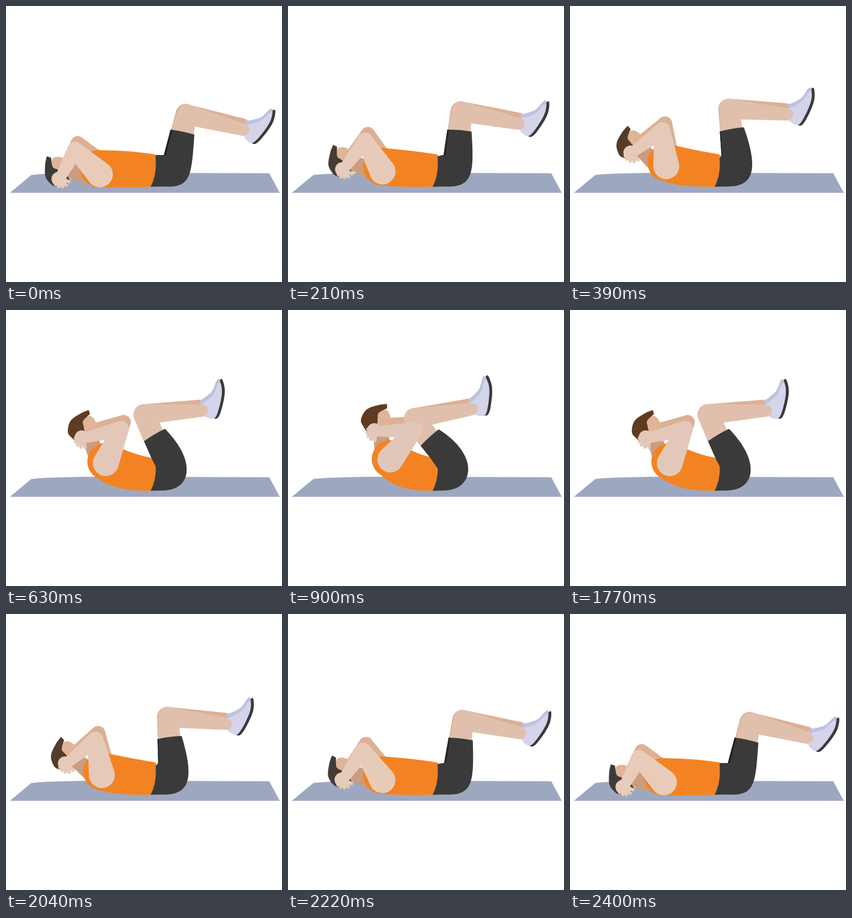
Recreate the animation shown at these times as an HTML page with a canvas. Size 500 by 500 pixels, loop 3000 ms.

```html
<!DOCTYPE html>
<html lang="en">
<head>
<meta charset="utf-8">
<title>Crunch</title>
<style>
html, body { margin: 0; width: 100%; height: 100%; overflow: hidden; background: #fff; }
canvas { display: block; width: 100vw; height: 100vh; }
</style>
</head>
<body>
<canvas id="stage" width="500" height="500"></canvas>
<script>
const ctx = document.getElementById('stage').getContext('2d');
const RAD = Math.PI / 180;
const LOOP = 3000, HALF = 1500, MOVE = 900, STEP = 30;
const HIP = [278, 307], WAIST = [255, 310], SEAT = [262, 327.5];
const FRONT = '#e0c0ad', BACK = '#dcb094', FACE = '#dfb498', NECK = '#cb9c7d';
const ORANGE = '#f38322', DARK = '#3a3a3a';

// Outlines around the tip of the fringe and around the ankle.
const HAIR = [[1, 0], [1, 8], [-14, 16], [-16, 26], [-18, 40], [-30, 54], [-43, 39], [-46, 27], [-36, 10], [-15, 2]];
const HEAD = [[-14, 14], [0, 11], [7, 23], [5, 45], [1, 57], [-20, 60], [-30, 45], [-18, 25]];
const SHOE = [[-2.5, -14.5], [24, -21], [40, -35], [46, -35], [42, -15], [27, 8], [9, 25], [-5, 15]];

const lerp = (a, b, u) => a + (b - a) * u;
const mix = (p, q, u) => p.map((v, i) => lerp(v, q[i], u));
const rgb = (a, b, u) => `rgb(${mix(a, b, u).map(Math.round)})`;

// Point (x, y) of a frame turned by deg around its origin.
function local([ox, oy], deg, x, y) {
  const c = Math.cos(deg * RAD), s = Math.sin(deg * RAD);
  return [ox + x * c - y * s, oy + x * s + y * c];
}
// Degrees run clockwise from straight up.
const polar = (origin, deg, r) => local(origin, deg, 0, -r);

function disc([x, y], r, color) {
  ctx.fillStyle = color;
  ctx.beginPath();
  ctx.arc(x, y, r, 0, 7);
  ctx.fill();
}

function limb(a, ra, b, rb, color) {
  const dx = b[0] - a[0], dy = b[1] - a[1];
  const dir = Math.atan2(dy, dx), t = Math.acos((ra - rb) / Math.hypot(dx, dy));
  ctx.fillStyle = color;
  ctx.beginPath();
  ctx.arc(...a, ra, dir + t, dir - t);
  ctx.arc(...b, rb, dir - t, dir + t);
  ctx.fill();
}

// Closed smooth outline; the listed corners stay sharp.
function blob(pts, color, corners = []) {
  const n = pts.length;
  const slope = i => {
    if (corners.includes(i)) return [0, 0];
    const a = pts[(i + n - 1) % n], b = pts[(i + 1) % n];
    return [(b[0] - a[0]) / 6, (b[1] - a[1]) / 6];
  };
  ctx.fillStyle = color;
  ctx.beginPath();
  ctx.moveTo(...pts[0]);
  pts.forEach((p, i) => {
    const j = (i + 1) % n, q = pts[j], m = slope(i), k = slope(j);
    ctx.bezierCurveTo(p[0] + m[0], p[1] + m[1], q[0] - k[0], q[1] - k[1], ...q);
  });
  ctx.fill();
}

function placed([x, y], deg, paint) {
  ctx.save();
  ctx.translate(x, y);
  ctx.rotate(deg * RAD);
  paint();
  ctx.restore();
}

function mat() {
  ctx.fillStyle = '#9da8c0';
  ctx.beginPath();
  ctx.moveTo(7, 338.5);
  ctx.lineTo(46, 306);
  ctx.bezierCurveTo(75, 303, 130, 302, 200, 302);
  ctx.lineTo(477, 303);
  ctx.lineTo(496, 338.5);
  ctx.fill();
}

function shoe(s) {
  const layer = (x, y, color) => placed([x, y], 0, () => blob(SHOE, color, [0, 7]));
  layer(5, 2, DARK);
  blob(SHOE, rgb([192, 192, 226], [187, 197, 217], s), [0, 7]);
  ctx.clip();
  layer(-1, 7, '#d4d4ea');
}

function leg(s) {
  const front = 24.4 - 48.2 * s, back = 23.2 - 47 * s, shin = 13.5 - 24.2 * s;
  const thigh = (deg, color) => limb(polar(HIP, deg, 121), 18.5, local(HIP, deg, 8, -80), 20, color);
  const knee = polar(HIP, front, 121);
  const ankle = local(knee, shin, 112 - 3 * s, -2 * s);
  thigh(back, BACK);
  limb(knee, 18.5, local(knee, shin, 103, -5), 12, BACK);
  placed(ankle, -31 * s, () => shoe(s));
  thigh(front, FRONT);
  limb(knee, 18.5, local(knee, shin, 105, 3), 11, FRONT);
  shorts(s, front);
}

function shorts(s, deg) {
  const left = local(HIP, deg, -16 + 6 * s, -84 + 13 * s);
  const right = local(HIP, deg, 27 + 5 * s, -93.5 + 8.5 * s);
  const fold = mix([286, 270], [257, 267], s);
  const rim = local(mix(left, right, 0.5), deg, 0, -2);
  ctx.fillStyle = DARK;
  ctx.beginPath();
  ctx.moveTo(...left);
  ctx.quadraticCurveTo(...rim, ...right);
  ctx.bezierCurveTo(...mix([336, 310], [347, 262], s), ...mix([335, 330], [338, 325], s), 285, 327);
  ctx.lineTo(...SEAT);
  ctx.quadraticCurveTo(271, 310, 271.5, 288);
  ctx.lineTo(271, 270 + 17 * s);
  ctx.lineTo(...fold);
  ctx.fill();

  const gap = Math.max(0, 4 - 6 * s);
  ctx.fillStyle = '#202122';
  ctx.beginPath();
  ctx.moveTo(...left);
  ctx.lineTo(left[0] + gap * 0.75, left[1]);
  ctx.lineTo(fold[0] + gap, fold[1]);
  ctx.lineTo(...fold);
  ctx.fill();
}

function torso(s) {
  const deg = -80 + 20 * s, chest = polar(WAIST, deg, 88 - 8 * s);
  disc(chest, 34, ORANGE);
  ctx.beginPath();
  ctx.moveTo(...polar(chest, deg + 90, 34));
  ctx.quadraticCurveTo(228, 262, 271, 269);
  ctx.lineTo(280, 300);
  ctx.lineTo(...SEAT);
  ctx.quadraticCurveTo(198, 329, ...polar(chest, deg - 90, 34));
  ctx.fill();
}

function hand(color) {
  disc([-1, -2], 13, color);
  for (let i = 0; i < 5; i++) limb([0, 0], 5, polar([0, 0], -72 - 27 * i, 13 + i), 3, color);
}

function draw(s) {
  const shoulder = polar(WAIST, -86.6 + 26 * s, 85 - 5 * s);
  const elbow = polar(shoulder, -45.6 + 85.3 * s ** 0.85, 63 + 6 * s);
  const palm = polar(shoulder, -96.3 + 67.5 * s, 73 - 15 * s);
  const wrist = mix(palm, elbow, 0.14);
  const fringe = polar(palm, -31 + 54 * s, 46.5 + 7.5 * s);
  const farElbow = [elbow[0] + 5, elbow[1] - 12];
  const turn = -72 * (1 - s);
  const arm = rgb([232, 203, 185], [225, 199, 185], s);
  const hair = rgb([59, 59, 60], [95, 60, 33], Math.min(1, s * 1.8));

  ctx.fillStyle = '#fff';
  ctx.fillRect(0, 0, 500, 500);
  mat();
  limb(polar(shoulder, -5 + 46 * s, 26), 15, farElbow, 13, BACK);
  limb(farElbow, 13, polar(palm, 20 + 32 * s, 25), 9, BACK);
  placed(fringe, turn, () => blob(HEAD, FACE));
  limb(local(fringe, turn, -10, 56), 14, polar(shoulder, -95 + 60 * s, 24), 15, NECK);
  placed(fringe, turn, () => blob(HAIR, hair, [0, 1]));
  torso(s);
  leg(s);
  limb(shoulder, 23.5, elbow, 14.5, arm);
  limb(elbow, 14.5, wrist, 10, arm);
  placed(palm, turn, () => hand(arm));
}

const ease = u => u * u * (3 - 2 * u);

// Up in the first half, down in the second, each followed by a rest.
function pose(ms) {
  const t = Math.floor(ms % LOOP / STEP) * STEP;
  const e = ease(Math.min(1, t % HALF / MOVE));
  return t < HALF ? e : 1 - e;
}

const start = performance.now();
function tick() {
  draw(pose(performance.now() - start));
  requestAnimationFrame(tick);
}
tick();
</script>
</body>
</html>
```
